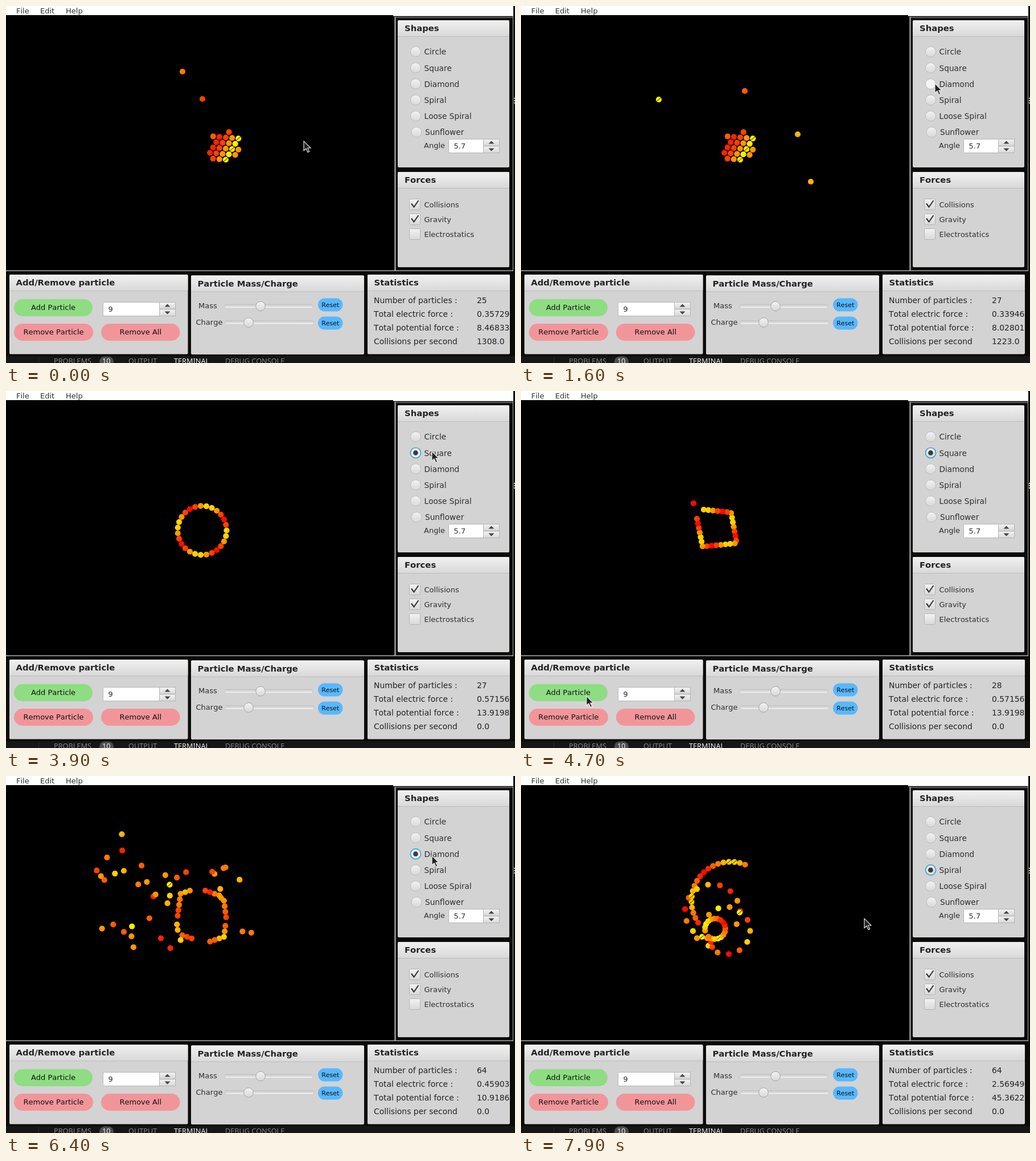
An HTML page for the animation above (8000 ms loop, 894 by 626 pixels).

```html
<!DOCTYPE html>
<html lang="en">
<head>
<meta charset="utf-8">
<title>Particle simulator</title>
<style>
  html, body { margin: 0; width: 100%; height: 100%; overflow: hidden; background: #0b0b09; }
  svg { display: block; width: 894px; height: 626px; }
  text { font: 13px "DejaVu Sans", sans-serif; font-kerning: none; fill: #2e2e2e; white-space: pre; }
  .title { font-weight: bold; font-size: 14.8px; fill: #222; }
  .radio { font-size: 13.7px; }
  .stat { font-size: 13.9px; fill: #222; }
  .mid { text-anchor: middle; fill: #111; }
  .small { font-size: 11px; }
  .tab { font: 12.7px "Noto Sans", sans-serif; fill: #858585; }
  .tab.bright { fill: #eee; }
</style>
</head>
<body>
<svg viewBox="0 0 894 626">
  <defs id="defs">
    <linearGradient id="head" x2="0" y2="1"><stop stop-color="#f0f0f0"/><stop offset="1" stop-color="#d9d9d9"/></linearGradient>
    <linearGradient id="knob" x2="0" y2="1"><stop stop-color="#f3f3f3"/><stop offset="1" stop-color="#d8d8d8"/></linearGradient>
    <linearGradient id="track" x2="0" y2="1"><stop stop-color="#c4c4c4"/><stop offset="1" stop-color="#f4f4f4"/></linearGradient>
    <clipPath id="statClip"><rect x="635" y="500" width="250" height="110"/></clipPath>
  </defs>
  <g id="ui"></g>
  <g id="balls"></g>
  <path id="cursor" d="M0 0V16.5L4 13L7 19.5L9.8 18.2L6.8 12H12Z" fill="#222" stroke="#eee" stroke-width="1.1"/>
</svg>
<script>
const LOOP = 8000, STEP = 100;
const byId = id => document.getElementById(id);
const ui = byId('ui');

function add(parent, tag, attrs, content) {
  const el = document.createElementNS('http://www.w3.org/2000/svg', tag);
  for (const k in attrs) el.setAttribute(k, attrs[k]);
  if (content !== undefined) el.textContent = content;
  parent.append(el);
  return el;
}
const rect = (x, y, w, h, fill, more) => add(ui, 'rect', { x, y, width: w, height: h, fill, ...more });
const label = (x, y, s, cls = '') => add(ui, 'text', { x, y, class: cls }, s);
const path = (d, more) => add(ui, 'path', { d, ...more });
const list = (n, make) => Array.from({ length: n }, (_, i) => make(i));

// ---- window ----
function panel(x, y, w, h, title, titleX) {
  rect(x, y, w, h, '#d3d3d3', { rx: 2 });
  rect(x, y, w, 28, 'url(#head)', { rx: 2 });
  rect(x, y + 28, w, 1, '#bdbdbd');
  label(titleX, y + 19, title, 'title');
}
function button(x, y, w, h, fill, s, cls = '') {
  rect(x, y, w, h, fill, { rx: h / 2 });
  label(x + w / 2, Math.floor(y + h / 2) + 4, s, 'mid ' + cls);
}
function spinner(x, y, w, h, value) {
  const split = x + w - 29, cx = x + w - 14.5, half = h / 2;
  rect(x + .5, y + .5, w - 1, h - 1, '#fff', { stroke: '#b5b5b5', rx: 2 });
  for (const top of [y, y + half])
    rect(split + .5, top + .5, 28, half - 1, 'url(#knob)', { stroke: '#b5b5b5' });
  path(`M${cx - 5} ${y + 8.5}l5-5l5 5zM${cx - 5} ${y + h - 8.5}l5 5l5-5z`, { fill: '#444' });
  label(x + 9.5, y + half + 4.5, value);
}
function slider(x, y, w, knobX) {
  rect(x, y - 3.5, w, 7, 'url(#track)', { rx: 3.5, stroke: '#c2c2c2', 'stroke-width': .6 });
  add(ui, 'circle', { cx: knobX, cy: y, r: 8.3, fill: 'url(#knob)', stroke: '#a5a5a5' });
}

rect(0, 0, 894, 626, '#0b0b09');
rect(0, 0, 891, 16, '#fff');
rect(0, 16, 682, 447, '#000');
rect(680, 16, 211, 1.8, '#f4f4f4');
rect(682, 19, 3, 445, '#858585');
rect(685, 19.5, 206, 1.5, '#777');
rect(890, 18, 1, 447, '#aaa');
rect(0, 463.5, 891, 1.3, '#c4c4c4');
for (const y of [161, 165, 169]) rect(892, y, 2, 2, '#ccc');
label(18, 13, 'File'); label(60, 13, 'Edit'); label(105, 13, 'Help');

panel(688, 25, 196, 258, 'Shapes', 700);
const radios = ['Circle', 'Square', 'Diamond', 'Spiral', 'Loose Spiral', 'Sunflower'].map((name, i) => {
  const x = i === 5 ? 721 : 719.5, y = 80.3 + 28.2 * i;
  label(x + 15, Math.round(y + 5), name, 'radio');
  return {
    y,
    ring: add(ui, 'circle', { cx: x, cy: y, r: 9 }),
    dot: add(ui, 'circle', { cx: x, cy: y, r: 4.4, fill: '#3c3c3c' })
  };
});
label(734, 249, 'Angle');
spinner(777, 233, 90, 25, '5.7');

panel(688, 291, 196, 167, 'Forces', 700);
['Collisions', 'Gravity', 'Electrostatics'].forEach((name, i) => {
  const y = 348 + 26 * i;
  rect(708.5, y - 9.5, 19, 19, 'url(#knob)', { stroke: '#b4b4b4', rx: 2 });
  if (i < 2) path(`M712 ${y - 1.5}l4.5 6l8-11.5`, { fill: 'none', stroke: '#333', 'stroke-width': 2.1 });
  label(734.5, y + 5, name);
});

panel(6, 471, 313.5, 139.5, 'Add/Remove particle', 17.5);
button(14, 514, 138, 30, '#8edd82', 'Add Particle');
button(14, 557, 139, 30, '#f2959a', 'Remove Particle');
button(167, 557, 138.5, 30, '#f2959a', 'Remove All');
spinner(170, 519, 128, 25, '9');

panel(325, 472.5, 304, 138.5, 'Particle Mass/Charge', 336.5);
label(338, 530, 'Mass'); slider(384, 526.5, 155, 447);
label(333.5, 559, 'Charge'); slider(385, 555, 156, 426);
for (const y of [512.5, 544.5]) button(548, y, 43.5, 23, '#57b8ff', 'Reset', 'small');

panel(635, 471, 250, 139.5, 'Statistics', 646.5);
const statGroup = add(ui, 'g', { 'clip-path': 'url(#statClip)' });
const statValues = ['Number of particles :', 'Total electric force :', 'Total potential force :', 'Collisions per second'].map((name, i) => {
  const y = Math.round(521.3 + 24 * i);
  label(646, y, name, 'stat');
  return add(statGroup, 'text', { x: 827, y, class: 'stat' });
});

rect(0, 614, 894, 12, '#161616');
rect(57, 616, 1, 10, '#2c2c2c');
rect(164, 614.5, 25, 18, '#4d4d4d', { rx: 9 });
label(84, 626.5, 'PROBLEMS', 'tab');
label(169, 626.5, '10', 'tab bright');
label(215, 626.5, 'OUTPUT', 'tab');
label(295, 626.5, 'TERMINAL', 'tab bright');
label(385, 626.5, 'DEBUG CONSOLE', 'tab');

// ---- particle layouts: points are [x, y, heat], heat 0 (red) to 4 (yellow) ----
const mix = (a, b, u) => a + (b - a) * u;
const wave = (i, period) => 4 * Math.abs(2 * ((i / period % 1 + 1) % 1) - 1);

let seed = 11;
const random = () => (seed = seed * 16807 % 2147483647) / 2147483647;
const between = (a, b) => mix(a, b, random());

// n points evenly spaced along a polyline
function along(corners, n, tone, closed) {
  const pts = closed ? [...corners, corners[0]] : corners;
  const legs = pts.slice(1).map((p, i) => Math.hypot(p[0] - pts[i][0], p[1] - pts[i][1]));
  const total = legs.reduce((a, b) => a + b);
  return list(n, i => {
    let d = total * i / (closed ? n : n - 1), k = 0;
    while (k < legs.length - 1 && d > legs[k]) d -= legs[k++];
    const u = d / legs[k], a = pts[k], b = pts[k + 1];
    return [mix(a[0], b[0], u), mix(a[1], b[1], u), tone(i)];
  });
}
// n points on a circle, angles in degrees
const arc = (cx, cy, r, from, to, n, tone) => list(n, i => {
  const a = mix(from, to, i / (n - 1)) * Math.PI / 180;
  return [cx + r * Math.cos(a), cy + r * Math.sin(a), tone(i)];
});
const CX = 344.5, CY = 244.5;
const scaled = (pts, s) => pts.map(([x, y, h]) => [mix(CX, x, s), mix(CY, y, s), h]);

// hexagonal packing, one [first, last] column span per row
const cluster = [[-1, -1], [-3, 1], [-2, 1], [-2, 2], [-2, 2], [-1, 1]].flatMap(([first, last], i) =>
  list(last - first + 1, j => {
    const row = i - 3, col = first + j;
    return [386 + 11.1 * col - 5.6 * row, 250 + .9 * col + 9.3 * row, wave(col - 1, 5.6)];
  }));
const settled = cluster.map(([x, y, h]) => [x - 1, y, h]);

const sideTone = i => wave(i - .5, 7);
const edgeTone = i => wave(i - 1, 4.6);
const collapse = [
  ...along([[333, 182], [368, 210], [393, 238], [375, 264], [358, 279], [332, 247], [328, 216]], 12, () => between(2, 4)),
  ...along([[353, 266], [381, 241]], 15, () => between(0, .8)).map(([x, y, h]) => [x + between(-3, 3), y + between(-3, 3), h])];
const circle = arc(CX, CY, 43, 0, 360 * 26 / 27, 27, sideTone);
const skewed = [...along([[321, 208], [369, 213], [379, 267], [319, 273], [309, 224]], 27, sideTone), [303, 197, 0]];
const square = along([[310, 210], [379.5, 210], [379.5, 279], [310, 279]], 28, sideTone, true);
const diamond = along([[340.5, 108], [407, 253], [340.5, 398], [274, 253]], 64, edgeTone, true);
const spiral = [
  ...arc(368, 219, 68.5, -68, -214, 19, i => wave(i - 2.5, 11)),
  ...arc(336, 238, 48, 27, -225, 11, edgeTone),
  ...arc(361, 271, 41.5, -138, 140, 11, edgeTone),
  ...arc(341, 268, 18, -190, 130, 18, i => wave(i - 2, 12)),
  ...arc(318, 300, 18, -120, 0, 5, edgeTone)];

// new balls scatter over the upper left, outside the square, lowest first
const strays = [];
while (strays.length < 36) {
  const x = 25 + 455 * random() ** 1.3, y = between(38, 291);
  if (Math.max(Math.abs(x - CX), Math.abs(y - CY)) > 44) strays.push([x, y, between(0, 4)]);
}
strays.sort((a, b) => b[1] - a[1]);

// pair every ball with its nearest free place; places left over belong to new balls
function follow(from, to) {
  const free = [...to];
  const taken = from.map(([x, y]) => {
    const gaps = free.map(p => Math.hypot(p[0] - x, p[1] - y));
    return free.splice(gaps.indexOf(Math.min(...gaps)), 1)[0];
  });
  return [...taken, ...free];
}

const linear = u => u, smooth = u => u * u * (3 - 2 * u), settle = u => 1 - (1 - u) ** 2;
const flung = [[393, 149, 1.5], [486, 225, 3], [242, 164, 4], [509, 308, 3]];
const keys = [
  [0, [...cluster, [310, 115, 2], [345, 163, 1]]],
  [1600, [...settled, ...flung], linear],
  [2400, [...settled, ...flung.map(([x, y, h]) => [x + 4, y + 11, h])], linear]];
const morph = (time, pts, ease) => keys.push([time, follow(keys.at(-1)[1], pts), ease]);
const hold = time => keys.push([time, keys.at(-1)[1], linear]);
hold(2700);
morph(3000, collapse, linear);
morph(3500, circle, settle);
hold(3900);
morph(4700, skewed, smooth);
morph(5250, [...square, ...scaled(strays, 1.02)], settle);
morph(5900, [...square, ...strays], linear);
morph(6300, [...square, ...scaled(strays, .8)], u => u * u);
morph(6900, diamond, settle);
hold(7300);
morph(7900, spiral, smooth);
hold(LOOP);

const birth = i => i < 25 ? 0 : i < 27 ? 450 + 150 * (i - 25) : i === 27 ? 4600 : 4750 + 20 * (i - 28);

// ---- cursor, selection, statistics ----
// arrival, departure, x, y
const stops = [[0, 0, 523, 237], [400, 600, 115, 535], [1500, 1800, 727, 136], [2400, 2700, 738, 82], [3000, 4000, 748, 106],
  [4550, 5400, 115, 535], [5800, 6350, 748, 139], [6800, 7400, 751, 161], [7900, LOOP, 603, 250]];
// time, selected radio, has focus
const choices = [[0, -1], [2700, 0, true], [3900, 1, true], [4750, 1], [6300, 2, true], [7300, 3, true]];
// time, electric force, potential force, collisions
const readings = [
  [0, '0.35729', '8.46833', '1308.0'],
  [1200, '0.33946', '8.02801', '1223.0'],
  [2700, '0.40887', '9.60224', '1356.0'],
  [3700, '0.57156', '13.9198', '0.0'],
  [5500, '0.45903', '10.9186', '0.0'],
  [6700, '0.76201', '17.2555', '0.0'],
  [7600, '2.56949', '45.3622', '0.0']];
const latest = (rows, t) => rows.findLast(r => r[0] <= t);

// ---- balls ----
for (let i = 0; i <= 8; i++) {
  const hue = i * 6.8;
  const g = add(byId('defs'), 'linearGradient', { id: 'heat' + i, x2: 1, y2: 1 });
  add(g, 'stop', { 'stop-color': `hsl(${hue + 5},100%,50%)` });
  add(g, 'stop', { offset: 1, 'stop-color': `hsl(${Math.max(0, hue - 2)},100%,50%)` });
}
const balls = list(64, () => {
  const g = add(byId('balls'), 'g', {});
  return {
    g,
    disc: add(g, 'circle', { r: 5.1 }),
    slash: add(g, 'path', { d: 'M-3.8 3.2L3.8-3.2', stroke: '#221c00', 'stroke-width': 1 })
  };
});

function drawBalls(t) {
  const k = keys.findIndex(key => key[0] > t);
  const a = keys[k - 1], b = keys[k];
  const u = (t - a[0]) / (b[0] - a[0]), e = b[2](u);
  balls.forEach((ball, i) => {
    const alive = t >= birth(i);
    ball.g.style.display = alive ? '' : 'none';
    if (!alive) return;
    const to = b[1][i] || keys.find(key => key[1][i])[1][i], from = a[1][i] || to;
    const shake = t < 2400 && i < cluster.length ? 1.5 * Math.sin(Math.PI * u) : 0;
    const x = mix(from[0], to[0], e) + shake * Math.sin(t / 70 + i * 2.1);
    const y = mix(from[1], to[1], e) + shake * Math.cos(t / 90 + i * 1.7);
    const heat = mix(from[2], to[2], e);
    ball.g.setAttribute('transform', `translate(${x.toFixed(2)} ${y.toFixed(2)})`);
    ball.disc.setAttribute('fill', `url(#heat${Math.round(heat * 2)})`);
    ball.slash.style.display = heat > 3.6 && i % 3 ? '' : 'none';
  });
}

function cursorAt(t) {
  const k = Math.max(0, stops.findLastIndex(s => s[0] <= t));
  const [, leave, x, y] = stops[k], next = stops[k + 1];
  if (t <= leave || !next) return [x, y];
  const u = smooth((t - leave) / (next[0] - leave));
  return [mix(x, next[2], u), mix(y, next[3], u)];
}

function draw(t) {
  drawBalls(t);
  const [px, py] = cursorAt(t);
  byId('cursor').setAttribute('transform', `translate(${px} ${py})`);

  const [, chosen, focused] = latest(choices, t);
  radios.forEach(({ y, ring, dot }, i) => {
    const on = i === chosen, lit = on && focused;
    const hover = px > 708 && px < 830 && Math.abs(py - y) < 13;
    ring.setAttribute('fill', hover ? '#f4f4f4' : 'url(#knob)');
    ring.setAttribute('stroke', lit ? '#35a6d6' : '#bcbcbc');
    ring.setAttribute('stroke-width', lit ? 1.7 : 1);
    dot.style.display = on ? '' : 'none';
  });

  const count = balls.filter((_, i) => birth(i) <= t).length;
  [count, ...latest(readings, t).slice(1)].forEach((s, i) => statValues[i].textContent = s);
}

const origin = performance.now();
function tick() {
  const t = (performance.now() - origin) % LOOP;
  draw(Math.floor(t / STEP) * STEP);
  requestAnimationFrame(tick);
}
tick();
</script>
</body>
</html>
```
